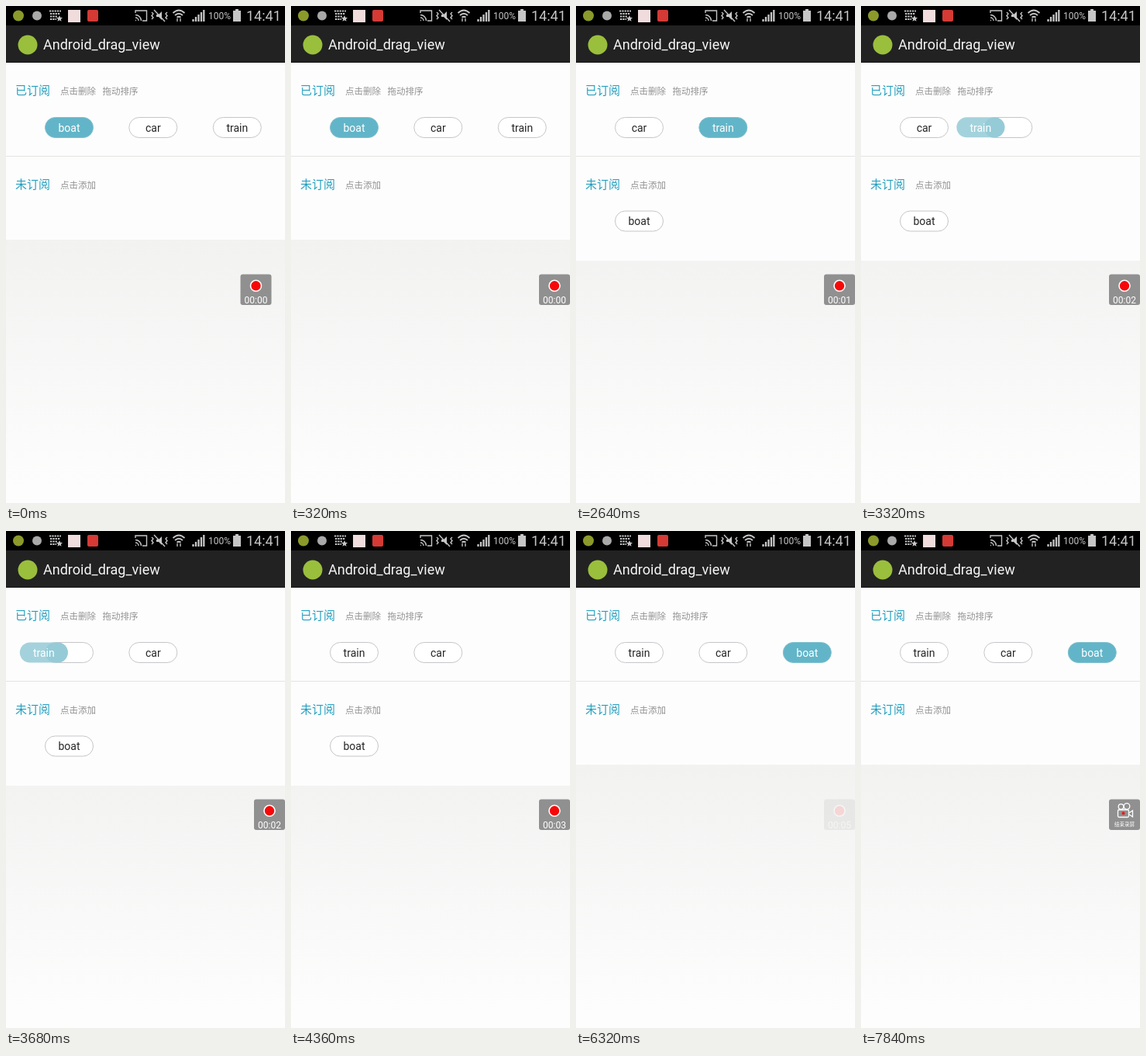
An HTML page for the animation above (8 s loop, 360 by 640 pixels).

```html
<!DOCTYPE html>
<html lang="zh">
<head>
<meta charset="utf-8">
<style>
  html, body { margin: 0; width: 100%; height: 100%; overflow: hidden; background: #fdfdfd; }
  svg { display: block; width: 360px; height: 640px; font-family: Roboto, "Noto Sans CJK SC", "Noto Sans CJK", sans-serif; }
  .head { font-size: 15px; fill: #239fbf; }
  .hint { font-size: 11.5px; fill: #929292; }
  .pill { font-size: 14px; text-anchor: middle; }
  .icon { fill: none; stroke: #c6c6c6; stroke-width: 1.4; }
  .solid { fill: #c6c6c6; }
</style>
</head>
<body>
<svg viewBox="0 0 360 640">
  <defs>
    <linearGradient id="fade" gradientUnits="userSpaceOnUse" x1="0" y1="300" x2="0" y2="620">
      <stop stop-color="#f2f2f1"/><stop offset="1" stop-color="#fdfdfd"/>
    </linearGradient>
  </defs>
  <rect width="360" height="640" fill="url(#fade)"/>
  <rect id="panel" y="73" width="360" height="228" fill="#fdfdfd"/>

  <rect width="360" height="25"/>
  <rect y="25" width="360" height="48" fill="#222223"/>
  <rect y="72" width="360" height="1" fill="#131313"/>
  <circle cx="28" cy="50" r="12.500" fill="#9abf3c"/>
  <text x="48" y="56" font-size="18" fill="#f6f6f6">Android_drag_view</text>

  <circle cx="16" cy="12.500" r="7" fill="#8b9a2a"/>
  <circle cx="40" cy="12.500" r="6" fill="#a9a9a9"/>
  <g class="icon">
    <path d="M56 6.500h15M57 10h13M57 13.500h9M57 17h8" stroke-width="2" stroke-dasharray="2.300 1"/>
    <path d="M69 12l1.200 2.700 2.800.3-2.100 1.900.6 2.800-2.500-1.500-2.500 1.500.6-2.800-2.100-1.900 2.800-.3z" class="solid" stroke="none"/>
  </g>
  <rect x="80" y="5" width="16" height="16" fill="#f0dcdc"/>
  <rect x="105" y="5" width="14" height="15" rx="2" fill="#d53a35"/>
  <g class="icon">
    <path d="M167 9V6h14.500v13H176M167 18.500h1M167 15a4 4 0 0 1 4 4M167 11.500a7.500 7.500 0 0 1 7.500 7.500"/>
    <path d="M188 8l2 2-2 2.500 2 2.500-2 2M208 8l-2 2 2 2.500-2 2.500 2 2M191 5l14 15"/>
    <path d="M194 11h3l4-4v11l-4-4h-3z" class="solid" stroke="none"/>
    <path d="M215.500 9q7.500-7 15 0M218 12q5-4.500 10 0M220.500 14.800q2.500-2.200 5 0" stroke-width="1.800"/>
    <path d="M221 16v4M225 16v4" stroke-width="1.300"/>
    <path d="M241.500 20v-3M245 20v-6M248.500 20v-9M252 20V8M255.300 20V5" stroke-width="2.300"/>
  </g>
  <path class="solid" d="M296 4h4v2h3v14h-10V6h3z"/>
  <g class="solid">
    <text x="261" y="17" font-size="12">100%</text>
    <text x="310" y="19" font-size="18">14:41</text>
  </g>

  <text class="head" x="12" y="114">已订阅</text>
  <text class="hint" x="70" y="114">点击删除</text>
  <text class="hint" x="124.500" y="114">拖动排序</text>
  <path d="M0 193.500H360" stroke="#e3e3e2"/>
  <text class="head" x="12" y="235">未订阅</text>
  <text class="hint" x="70" y="235">点击添加</text>

  <g id="pills" class="pill"></g>

  <g id="widget">
    <rect width="40" height="39.500" y="345.500" rx="3" fill="#909090"/>
    <g id="timer">
      <circle cx="20" cy="360.300" r="7" fill="#f60808" stroke="#fff" stroke-width="1.600"/>
      <text id="clock" x="20" y="383" font-size="12" text-anchor="middle" fill="#fff">00:00</text>
    </g>
    <g id="camera">
      <g fill="none" stroke="#fff" stroke-width="1.300">
        <circle cx="15.500" cy="355" r="3.300"/><circle cx="23" cy="354.500" r="3.800"/>
        <rect x="11.500" y="359" width="14" height="9.500" rx="1.500"/>
        <path d="M26 363l4.500-3v8l-4.500-3"/>
      </g>
      <circle cx="18.500" cy="363.500" r="2" fill="#f01818"/>
      <text x="20" y="379.500" font-size="6.500" text-anchor="middle" fill="#fff">结束录屏</text>
    </g>
  </g>
</svg>
<script>
const LOOP = 8000, TOP = 143.5, LOW = 264;
const COLS = [50.5, 158.8, 267.3];
const TICKS = [1840, 2840, 3840, 4880, 5840, 6840];
// Finger path while dragging: time, x, y
const DRAG = [[3160, COLS[1], TOP], [3640, 17, 142.5], [3680, 17.8, TOP], [4000, 24, 136.5], [4340, 46, TOP]];

const $ = id => document.getElementById(id);
const clamp = v => Math.max(0, Math.min(1, v));
const part = (t, a, b) => clamp((t - a) / (b - a));
const ease = p => (1 - Math.cos(Math.PI * p)) / 2;
const mix = (a, b, p) => a + (b - a) * p;
const show = (id, on) => $(id).setAttribute('visibility', on ? 'visible' : 'hidden');

const shape = (x, y, attrs) => `<rect x="${x}" y="${y}" width="62" height="26" rx="13" ${attrs}/>`;
const label = (x, y, text, color) => `<text x="${x + 31}" y="${y + 18.3}" fill="${color}">${text}</text>`;
const off = (x, y, text = '') => shape(x, y, 'fill="#fff" stroke="#c6c6c9"') + label(x, y, text, '#272727');
const on = (x, y, text = '') => shape(x, y, 'fill="#62b5c8" stroke="#7fbfcd"') + label(x, y, text, '#fff');

function dragPoint(t) {
  const i = Math.max(1, DRAG.findIndex(k => k[0] > t));
  const [a, b] = [DRAG[i - 1], DRAG[i]];
  const p = ease(part(t, a[0], b[0]));
  return [mix(a[1], b[1], p), mix(a[2], b[2], p)];
}

// Translucent pill, slightly denser where it covers the empty slot
function ghost(x, y, slot) {
  return `<clipPath id="slot">${shape(slot, TOP, '')}</clipPath>` +
    shape(x, y, 'fill="#a4d2dc"') +
    `<g clip-path="url(#slot)">${shape(x, y, 'fill="#95cbd7"')}</g>` +
    label(x, y, 'train', '#fff');
}

function pills(t) {
  const [a, b, c] = COLS, boatLow = off(a, LOW, 'boat');
  if (t < 840) return on(a, TOP, 'boat') + off(b, TOP, 'car') + off(c, TOP, 'train');
  if (t < 1480) {
    const y = mix(TOP, LOW, ease(part(t, 1080, 1480)));
    return on(a, TOP) + off(b, TOP, 'car') + off(c, TOP, 'train') + off(a, LOW) + on(a, y, 'boat');
  }
  if (t < 3160) return off(a, TOP, 'car') + (t < 2640 ? off : on)(b, TOP, 'train') + boatLow;
  if (t < 4340) {
    const slot = t < 3500 ? b : a;
    const car = mix(a, b, ease(part(t, 3360, 3640)));
    return off(slot, TOP) + off(car, TOP, 'car') + boatLow + ghost(...dragPoint(t), slot);
  }
  const row = off(a, TOP, 'train') + off(b, TOP, 'car');
  if (t < 5840) return row + boatLow;
  if (t < 5920) return row + on(a, LOW, 'boat');
  if (t < 6320) {
    const p = ease(part(t, 5920, 6320));
    return row + off(c, TOP) + on(a, LOW) + on(mix(a, c, p), mix(LOW, TOP, p), 'boat');
  }
  return row + on(c, TOP, 'boat');
}

function draw(t) {
  $('panel').setAttribute('height', t >= 840 && t < 6320 ? 255 : 228);
  $('pills').innerHTML = pills(t);
  $('widget').setAttribute('transform', `translate(${mix(302.5, 320, part(t, 0, 320))})`);
  $('widget').setAttribute('opacity', t >= 4880 && t < 7520 ? 0.12 : 1);
  $('clock').textContent = '00:0' + TICKS.filter(k => t >= k).length;
  show('timer', t < 7560);
  show('camera', t >= 7560);
}

let start;
function frame(now) {
  start ??= now;
  draw((now - start) % LOOP);
  requestAnimationFrame(frame);
}
draw(0);
requestAnimationFrame(frame);
</script>
</body>
</html>
```
